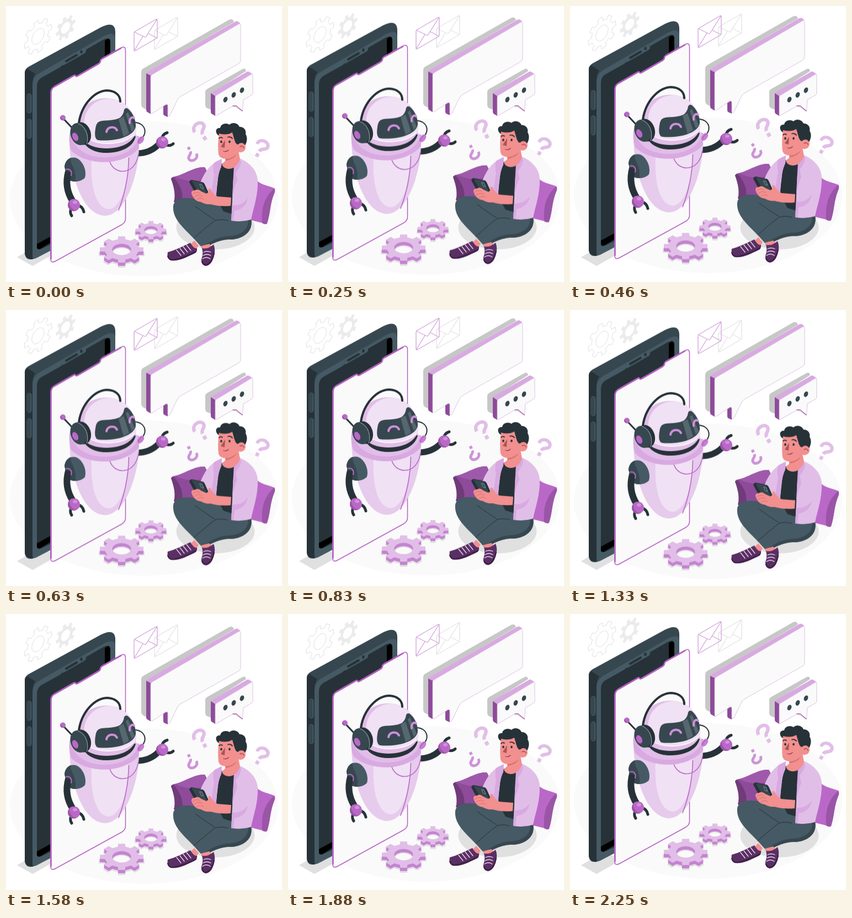
An HTML page for the animation above (2.29 s loop, 500 by 500 pixels).

```html
<!DOCTYPE html>
<html lang="en">
<head>
<meta charset="utf-8">
<title>Chat bot</title>
<style>
html, body { margin: 0; width: 100%; height: 100%; overflow: hidden; background: #fff; }
svg { display: block; width: 100vw; height: 100vh; }
.float { animation: float 2290ms linear infinite; }
/* a 1500 ms bob, cut short where the loop restarts */
@keyframes float {
  0%, 65.502% { transform: translateY(0); }
  32.751%, 98.253% { transform: translateY(-10px); }
  100% { transform: translateY(-9.47px); }
}
.line { fill: none; stroke-linecap: round; stroke-linejoin: round; }
.ink { fill: #263238; }
.slate { fill: #37474f; }
.steel { fill: #455a64; }
.pale { fill: #f0e1f4; }
.lilac { fill: #e1bee7; }
.mauve { fill: #d9a9e1; }
.violet { fill: #ba68c8; }
.plum { fill: #8d4b99; }
.skin { fill: #f28f8f; }
.paper { fill: #fafafa; }
</style>
</head>
<body>
<svg viewBox="0 0 500 500">
  <defs>
    <g id="ask">
      <path class="line" style="stroke-linecap:butt" stroke="currentColor" stroke-width="5.5" d="M-9 -1C-10 -13 9 -14 9 -4C9 2 0 1 0 8"/>
      <path fill="currentColor" d="M-3 12h6v6h-6z"/>
    </g>
    <path id="mail" class="line" stroke-width="1.3" d="M234 46L272 24Q274 23 274 25V56Q274 58 272 59L234 81Q232 82 232 80V49Q232 47 234 46ZM232.500 47L251 56Q253 57 254 55L273.500 24M232.500 80.500L248 55M273.500 58L258 50"/>
    <g id="joint">
      <circle class="violet" r="11"/>
      <path fill="#9a55a6" d="M-8 -7.500A11 11 0 0 0 5 9.800C-4 9 -9 1 -8 -7.500"/>
      <ellipse cx="2" cy="-5" rx="4" ry="3" fill="#ce93d8"/>
    </g>
  </defs>

  <ellipse class="paper float" cx="250" cy="349" rx="243" ry="141"/>
  <path fill="#e0e0e0" d="M20 455L48 471L96 444L60 432Z"/>
  <ellipse cx="379.500" cy="401" rx="71" ry="40" fill="#e0e0e0"/>

  <!-- small bubble -->
  <path fill="#c7c7c7" d="M361 156Q361 152 365 150L429 114Q434 112 435 118L372 158V188L364 185Q361 183 361 180Z"/>
  <path class="mauve" d="M371 159Q371 157 373 156L436 119.500Q438 118 440 119L446 122.500L379 163Z"/>
  <path class="plum" d="M371 158L379 163V199L373 195.500Q371 194 371 192Z"/>
  <path class="paper" stroke="#d5b3dc" stroke-width=".8" d="M379 165Q379 163 381 162L444 124Q447 122 447 125V157Q447 160 445 161L430 170L428.500 191L412 180.500L382 198Q379 200 379 196Z"/>
  <path class="line" stroke="#a45bb0" stroke-width="1.3" d="M411 181L417 181L428 190"/>
  <g class="slate">
    <ellipse transform="translate(397.500 169.500) rotate(25)" rx="3.600" ry="5.200"/>
    <ellipse transform="translate(412.500 161) rotate(25)" rx="3.600" ry="5.200"/>
    <ellipse transform="translate(427.500 152.500) rotate(25)" rx="3.600" ry="5.200"/>
  </g>

  <g class="float">
    <g id="cogs"></g>
    <use href="#mail" x="37" y="-3" stroke="#e3e3e3"/>
    <use href="#mail" stroke="#d3a0dc"/>

    <!-- big bubble -->
    <path fill="#c7c7c7" d="M245 120Q245 115 249 113L404 25Q411 22 413 29L255 121V188L249 185Q245 183 245 178Z"/>
    <path class="mauve" d="M254 123Q254 121 257 119L415 28.500Q418 27 420 28L424.500 31L262 127Z"/>
    <path class="plum" d="M254 122L262 126V195.500L256 192Q254 191 254 188ZM285 179L293 176V201L287 198.500Q285 198 285 195Z"/>
    <path class="paper" stroke="#d5b3dc" stroke-width=".8" d="M262 128Q262 126 265 124L421 33Q425 31 425 35V98Q425 102 422 104L316 164Q312 166 310 171L298 196Q293 204 293 196V181Q293 177 289 179L266 194Q262 197 262 191Z"/>

    <!-- handset -->
    <path class="slate" d="M34 121Q34 114 41 110L172 38.500Q197 26 198 46V382L54 457Q34 464 34 446Z"/>
    <path class="ink" d="M34 121Q34 116 39 114L53 123Q48 130 48 142V459Q34 458 34 446Z"/>
    <path class="steel" d="M48 143Q48 129 60 122L178 54Q198 44 198 60V380L56 456Q48 460 48 451Z"/>
    <path class="ink" d="M56 146Q56 135 64 130L98 111Q101 109 102 107L142 84Q145 82 145 79L178 60Q189 55 189 66V380L64 440Q56 443 56 434Z"/>
    <path d="M179 63Q189 54 189 67V88L179 92ZM56 431L80 418V429L62 440Q56 442 56 437Z"/>
    <path class="steel" d="M100 103L145 78V82Q145 84 142 86L105 107Q101 109 100 103Z"/>
    <path class="line" stroke="#263238" stroke-width="4" d="M109 100L128 89"/>
    <ellipse class="ink" cx="136.500" cy="83" rx="2.200" ry="3"/>
    <path class="line" stroke="#455a64" stroke-width="9" d="M42 163V190M42 209V236"/>
    <path class="line" stroke="#37474f" stroke-width="7" d="M41 163V190M41 209V236"/>

    <!-- glass panel -->
    <path class="paper" stroke="#b45fc2" stroke-width="1.500" stroke-linejoin="round" d="M81 157Q81 150 87 146L122 126Q125 124 126 126Q127 128 130 126L168 104Q171 102 171 99Q171 97 174 95L208 76Q216.500 71 216.500 81V385Q216.500 392 210 396L90 462Q81 467 81 458Z"/>
    <path class="line" stroke="#b45fc2" stroke-width="2.600" d="M81.500 458V157Q81.500 150 87 146.500L122 126.500Q125 124.500 126 126.500Q127 128.500 130 126.500L168 104.500Q171 102.500 171 99.500Q171 97.500 174 95.500L208 76.500"/>

    <!-- robot -->
    <path class="line" style="stroke-linecap:butt" stroke="#263238" stroke-width="11" d="M236 267Q262 267 277 250"/>
    <path class="line" stroke="#263238" stroke-width="5" d="M282 242Q283 232 292 229.500M288 251Q297 255 303 249.500"/>
    <use href="#joint" x="283" y="247"/>
    <path fill="#e6cbec" d="M115 238C114 300 136 379 180 380C218 378 243 300 241 244Z"/>
    <path class="pale" d="M155 278C152 335 166 367 186 368C212 366 226 305 223 262Z"/>
    <path class="line" stroke="#ba68c8" stroke-width="1.600" d="M222.500 275C222 310 214 345 204 370M188 282C193 296 205 301 216 299C231 296 238 282 240 268"/>
    <path class="mauve" d="M116 228C113 240 115 252 118 262C145 289 212 292 241 257V236Z"/>
    <path class="lilac" d="M117 236C126 263 152 276 184 274C214 272 234 258 240 240L230 225L130 220Z"/>
    <path class="ink" d="M137 236C140 256 160 267 184 266C212 265 231 254 235 236Z"/>
    <path class="lilac" d="M131 222C126 190 150 166 183 167C217 168 236 194 236 222C236 244 213 258 182 258C151 258 134 244 131 222"/>
    <path class="pale" d="M142 225C137 191 157 170 185 167.500C217 169 236 194 236 222C236 238 215 249 185 249C160 249 145 240 142 225"/>
    <path class="line" stroke="#fff" stroke-width="1.500" d="M147 239C167 254 213 253 233 232"/>
    <path class="slate" d="M163 217Q165 209 174 208C190 207 203 206 208 201Q213 196 214 188Q216 183 221 186C230 194 235 205 235 217C235 230 215 241 190 243Q176 244 167 243Q158 241 163 217"/>
    <path fill="#56676f" d="M204 205L213 200L223 231L213 237ZM217 196L221 192L233 222L228 228Z"/>
    <path class="line" stroke="#d08edc" stroke-width="4" d="M182 228C184 218 197 217 201 225M224 212C223 204 228 200 232 203"/>

    <path class="line" stroke="#263238" stroke-width="4" d="M132 212C137 177 162 153 184 153C200 154 207 163 207 173"/>
    <path class="line" stroke="#263238" stroke-width="3" d="M103 203L120 221"/>
    <circle class="violet" cx="103" cy="202.500" r="5"/>
    <path fill="#8d4b99" d="M99 200A5 5 0 0 0 105 207Q100 206 99 200"/>
    <ellipse class="ink" transform="translate(138 231) rotate(-18)" rx="15.500" ry="21"/>
    <ellipse class="slate" transform="translate(132 232) rotate(-18)" rx="15" ry="20.500"/>
    <path class="line" stroke="#a6b0b5" stroke-width="1" d="M131 213C145 219 151 236 146 250"/>
    <ellipse class="violet" transform="translate(125.500 237) rotate(-25)" rx="5" ry="8"/>
    <path class="line" stroke="#263238" stroke-width="2" d="M235 211C250 213 257 226 247 239"/>
    <ellipse fill="#c77fd3" transform="translate(244 243) rotate(38)" rx="5" ry="8"/>
    <path class="line" stroke="#9a55a6" stroke-width="1" d="M240 247Q241 241 247 238"/>

    <path class="steel" d="M106 291C108 276 122 270 132 278C142 286 146 301 143 311C135 320 119 320 111 313Z"/>
    <path class="slate" d="M106 291C107 282 112 276 118 275C114 285 128 292 126 318Q117 318 111 313Z"/>
    <path class="line" style="stroke-linecap:butt" stroke="#263238" stroke-width="12" d="M113 300C107 322 112 340 121 354"/>
    <path class="line" stroke="#ba68c8" stroke-width="2" d="M109 296C116 294 120 300 118 307"/>
    <path class="line" stroke="#263238" stroke-width="5" d="M118 367Q115 374 119 380M130 361Q139 363 141 373"/>
    <use href="#joint" x="123" y="360.500"/>

    <!-- question marks -->
    <use href="#ask" color="#e1bee7" transform="translate(351.500 224.500) rotate(-30) scale(1.150)"/>
    <use href="#ask" color="#ce93d8" transform="translate(337 270) rotate(155) scale(.9)"/>
    <use href="#ask" color="#e1bee7" transform="translate(463 255.500) rotate(28) scale(1.100)"/>

    <!-- cushions -->
    <path class="plum" d="M299 313Q301 309 306 309C326 304 341 291 360 292Q366 300 370 324L350 350C332 349 320 358 304 355Q309 340 299 313"/>
    <path fill="#9f59ab" d="M306 309C326 304 341 291 360 292Q364 298 366 311C346 319 327 319 306 309"/>
    <path fill="#6f3b79" d="M299 313Q301 309 305 312Q322 332 319 352Q312 356 304 355Q309 340 299 313"/>
    <path class="violet" d="M450 312C460 324 474 325 486 330Q489 334 485 342C478 360 479 376 473 394Q470 397 464 393L436 386Z"/>
    <path fill="#9a55a6" d="M486 330Q489 334 485 342C478 360 479 376 473 394Q470 397 464 393C463 369 465 349 486 330"/>

    <!-- legs -->
    <path class="steel" d="M303 362C305 348 324 345 345 350L402 366L444 386C449 411 426 424 402 423C384 424 366 434 358 441L340 421C322 402 301 386 303 362"/>
    <path class="slate" d="M444 386C449 411 426 424 402 423C384 424 366 434 358 441L354 438C368 427 384 418 402 417C426 416 440 405 439 386Z"/>
    <path class="line" stroke="#263238" stroke-width="1" d="M340 421Q360 403 378 389Q390 385 402 389M343 363Q363 378 378 387"/>
    <path class="skin" d="M334 432L341 425L349 434L344 442ZM353 435L368 431L376 438L358 443Z"/>
    <path fill="#5a2f64" d="M293 446C306 443 323 434 334 429Q340 440 346 439Q347 445 342 448C329 454 314 463 299 461Q291 458 293 446M355 439Q366 441 376 432Q380 441 377 451C375 461 371 470 362 471Q353 469 354 459Q358 449 355 439"/>
    <path class="line" stroke="#3a1d42" stroke-width="2" d="M293 453Q295 461 304 460C320 457 330 452 344 445M355 463Q358 470 364 469Q374 464 377 448"/>
    <path class="line" stroke="#f0e1f4" stroke-width="1.300" d="M309 442L317 452M315 439L323 449M321 436L329 446M327 433L335 443M358 446Q364 443 371 446M357 452Q364 448 371 452M356 458Q363 453 370 458"/>

    <!-- upper body -->
    <path class="ink" d="M387 286L418 281L413 378L394 372L380 347Z"/>
    <path class="lilac" d="M391 277C371 284 358 302 350 326L360 344L381 348C381 324 383 304 390 291Z"/>
    <path class="mauve" d="M391 277L377 284Q374 295 377 306L372 338L381 348C381 324 384 304 390 291Z"/>
    <path class="lilac" d="M421 275C439 282 455 296 456 316C457 344 448 366 444 387Q426 392 408 389L410 350Q411 320 414 288Z"/>
    <path class="mauve" d="M421 275L426 282Q425 293 416 302L419 316Q412 331 410 350Q411 320 413 289Z"/>
    <path class="mauve" d="M410 361Q428 362 438 348Q434 368 414 371L412 389L408 389Z"/>
    <path class="skin" d="M397 270L421 262L424 278Q416 296 402 295Q392 293 391 286L397 281Z"/>
    <path fill="#d9716f" d="M398 276Q411 275 418 268Q413 278 398 280Z"/>

    <!-- head -->
    <path class="ink" d="M384 234C378 228 380 220 388 221C389 213 399 211 405 215C411 209 421 213 423 219C431 218 436 226 434 232C440 241 434 254 428 259L417 262L406 242Z"/>
    <path class="skin" d="M386 231Q400 235 410 229Q412 236 414 243Q416 250 420 251Q425 246 430 249Q437 254 432 262Q427 267 420 264Q413 276 399 277Q388 277 385 269Q383 251 386 231"/>
    <path fill="#a95454" d="M397 243L389 255L396 257Z"/>
    <path class="line" stroke="#263238" stroke-width="1.800" d="M386 239.500Q389 237 392 239M402 237.500Q407 236 410 240"/>
    <g class="ink"><ellipse cx="390" cy="246" rx="1.800" ry="2.200"/><ellipse cx="405" cy="246" rx="1.800" ry="2.200"/></g>
    <path class="line" stroke="#8f3f45" stroke-width="1.300" d="M394 263Q399 265 403 261M424 255Q429 252 431 257"/>

    <!-- phone in hands -->
    <path class="ink" d="M332 319Q333 315 337 315L355 319Q358 319 360 323L369 343L359 349L345 343Z"/>
    <path class="slate" d="M336 316L355 320L366 344L350 340Z"/>
    <path class="line" stroke="#78909c" stroke-width="1" d="M351 323L355 324L358 331L354 330Z"/>
    <path class="skin" d="M336 340Q335 334 342 334Q348 330 354 336L363 340L367 337Q365 329 370 331Q375 341 383 345L408 347L407 362Q388 364 370 359Q361 360 353 355Q341 354 336 340"/>
    <path class="line" stroke="#d9716f" stroke-width="1" d="M338 341Q345 335 351 339M341 346Q348 340 355 344M346 351Q352 345 358 350"/>
  </g>
</svg>
<script>
const cogs = document.getElementById('cogs');

// Toothed ring; m = [a, b, c, d] projects it onto a plane around (cx, cy).
function ring(cx, cy, r, hole, root, teeth, m, turn = 0) {
  const at = (rad, a) => {
    const x = rad * Math.cos(a), y = rad * Math.sin(a);
    return (cx + m[0] * x + m[2] * y).toFixed(1) + ' ' + (cy + m[1] * x + m[3] * y).toFixed(1);
  };
  const step = 2 * Math.PI / teeth, pts = [], inner = [];
  for (let i = 0; i < teeth; i++) {
    const a = i * step + turn;
    pts.push(at(root, a - step * .28), at(r, a - step * .2), at(r, a + step * .2), at(root, a + step * .28), at(root, a + step * .5));
  }
  for (let i = 0; i < 40; i++) inner.push(at(hole, i * Math.PI / 20));
  return `M${pts.join('L')}ZM${inner.join('L')}Z`;
}

function add(d, fill, stroke = 'none') {
  const p = document.createElementNS('http://www.w3.org/2000/svg', 'path');
  const attrs = { d, fill, stroke, 'fill-rule': 'evenodd', 'stroke-linejoin': 'round' };
  for (const k in attrs) p.setAttribute(k, attrs[k]);
  cogs.append(p);
}

const wall = [.866, -.5, 0, 1], floor = [1, 0, 0, .6];
add(ring(58, 55, 29, 13, 22, 8, wall, -.14), '#fff', '#dedede');
add(ring(108, 39.5, 20.5, 9.5, 15, 8, wall, -.14), '#ebebeb');

function solid(cx, cy, r, hole, root, depth) {
  const at = y => ring(cx, cy + y, r, hole, root, 8, floor);
  add(ring(cx, cy + depth + 2, r + 2, hole, root + 2, 8, floor), '#e0e0e0');
  for (let y = depth; y > 0; y--) add(at(y), '#c583d1');
  add(at(0), '#e1bee7');
}
solid(209.5, 441, 40, 17, 31, 6);
solid(262.5, 406, 28, 12, 21, 5);
</script>
</body>
</html>
```
